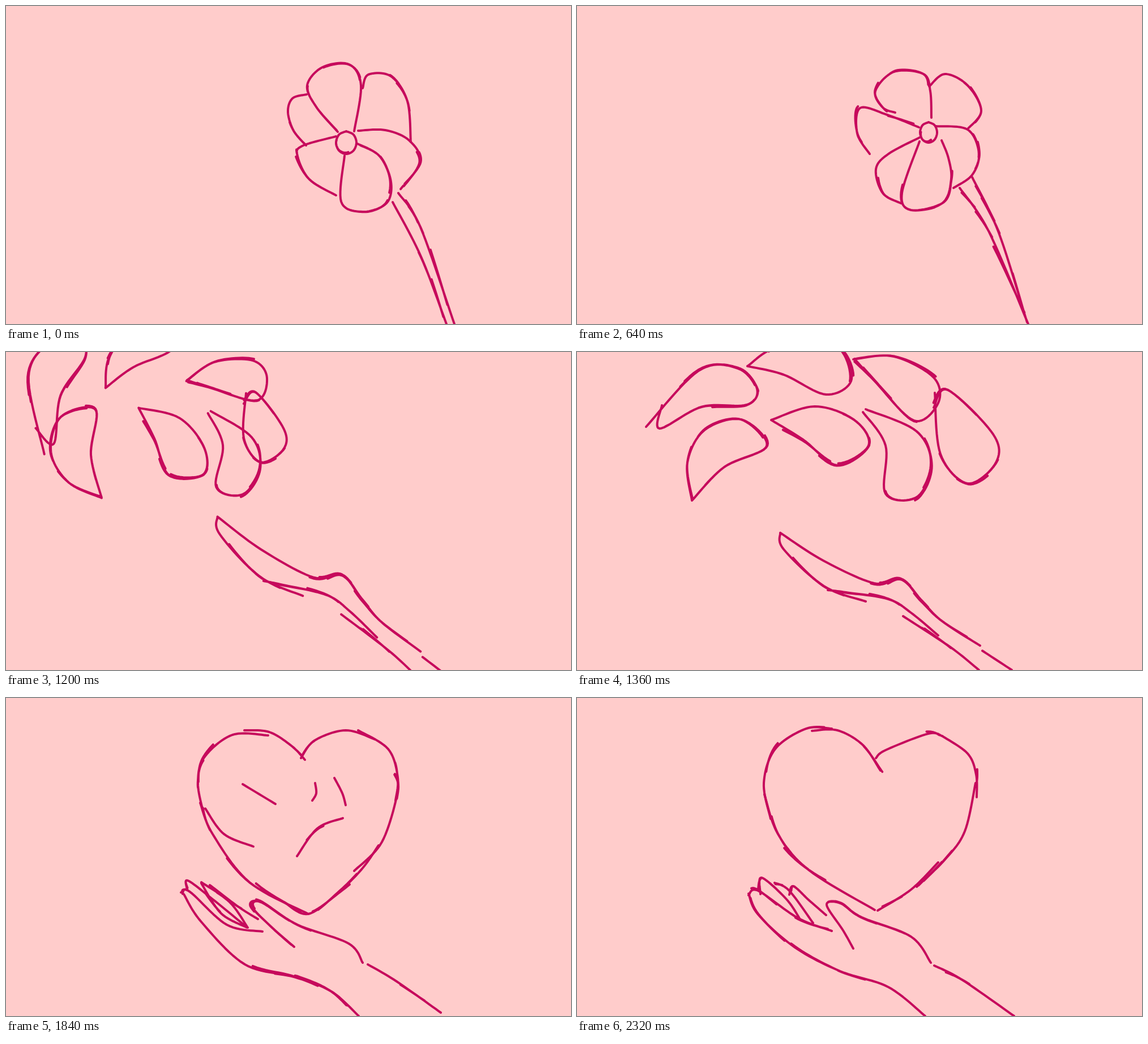
An HTML page with a canvas that plays this animation: 998x561 px, repeating every 2.4 s.

```html
<!DOCTYPE html>
<html lang="en">
<head>
<meta charset="utf-8">
<title>Flower to heart</title>
<style>
  html, body { margin: 0; height: 100%; overflow: hidden; background: #ffcccb; }
  canvas { display: block; width: 100vw; height: 100vh; }
</style>
</head>
<body>
<canvas id="stage" width="998" height="561"></canvas>
<script>
const LOOP = 2400, STEP = 80, HAND = 7;

const mix = (a, b, u) => a + (b - a) * u;
let seed = 7;
const random = () => (seed = seed * 16807 % 2147483647) / 2147483647;

const pairs = text => {
  const n = text.trim().split(/\s+/).map(Number), out = [];
  for (let i = 0; i < n.length; i += 2) out.push([n[i], n[i + 1]]);
  return out;
};
const ring = (x, y, rx, ry) => Array.from({ length: 9 }, (_, i) => {
  const a = i * Math.PI / 4;
  return [x + rx * Math.sin(a), y - ry * Math.cos(a)];
});

// Smooth curve through all points.
function curve(p) {
  const out = [];
  for (let i = 0; i < p.length - 1; i++) {
    const b = p[i], c = p[i + 1], a = p[i - 1] || b, d = p[i + 2] || c;
    for (let s = 0; s < 1; s += 1 / 12) {
      out.push([0, 1].map(k => b[k] + s / 2 * (c[k] - a[k]
        + s * (2 * a[k] - 5 * b[k] + 4 * c[k] - d[k] + s * (3 * (b[k] - c[k]) + d[k] - a[k])))));
    }
  }
  return [...out, p[p.length - 1]];
}

// The line itself plus short retraced bits that drift across it.
function sketch(points) {
  const line = curve(points), lines = [line];
  let length = 0;
  for (let i = 1; i < line.length; i++) {
    length += Math.hypot(line[i][0] - line[i - 1][0], line[i][1] - line[i - 1][1]);
  }
  for (let i = 0; i < Math.min(4, Math.floor(length / 80)); i++) {
    const start = Math.floor(random() * line.length * .7);
    const bit = line.slice(start, start + Math.ceil(line.length * mix(.2, .35, random())));
    const dx = mix(-4, 4, random()), dy = mix(-4, 4, random());
    lines.push(bit.map(([x, y], j) => {
      const k = 1 - 1.6 * j / bit.length;
      return [x + dx * k, y + dy * k];
    }));
  }
  return lines;
}

function part(text) {
  const strokes = typeof text === 'string' ? text.split('|').map(pairs) : [text];
  const main = strokes[0], [x0, y0] = main[0];
  const mean = k => main.reduce((sum, p) => sum + p[k], 0) / main.length;
  const reach = p => Math.hypot(p[0] - x0, p[1] - y0);
  const tip = main.reduce((a, b) => reach(b) > reach(a) ? b : a);
  return {
    x: mean(0), y: mean(1), size: reach(tip),
    angle: Math.atan2(tip[1] - y0, tip[0] - x0),
    lines: strokes.flatMap(sketch)
  };
}

// Each pose: six petals clockwise from the top, the centre, the stem or hand.
const pose = (...parts) => parts.map(part);

const left = pose(
  '586 222 548 178 532 140 559 108 606 103 627 140 615 221',
  '630 145 640 121 680 124 709 168 715 240',
  '622 220 670 219 712 237 732 275 697 323',
  '598 264 592 345 630 363 672 348 680 310 660 265 621 243',
  '583 230 523 247 515 265 536 306 583 334',
  '531 156 506 163 498 187 508 220 530 246',
  ring(601, 241, 18, 20),
  '693 330 732 390 792 561 | 683 346 733 442 778 561'
);

const right = pose(
  '613 209 559 160 560 115 600 88 647 95 653 140 640 196',
  '655 114 688 107 725 135 744 180 745 218',
  '641 205 700 212 740 235 742 280 705 318',
  '626 236 614 340 655 356 692 330 704 295 690 255 643 233',
  '611 218 553 252 552 285 580 322 612 346',
  '565 157 537 156 525 195 540 232 569 251',
  ring(631, 220, 14, 18),
  '730 321 757 395 784 561 | 703 317 745 430 778 561'
);

const back = pose(
  '562 188 540 179 527 150 560 116 612 120 624 150 626 197',
  '622 142 650 120 690 140 714 185 690 217',
  '634 212 690 218 710 260 698 298 665 321',
  '605 239 574 330 590 360 648 346 661 305 656 268 644 237',
  '605 232 550 261 528 288 540 330 572 348',
  '604 214 548 192 500 180 495 225 517 261',
  ring(621, 223, 15, 18),
  '698 302 745 400 795 558 | 676 321 727 397 797 561'
);

const gust = pose(
  '338 178 268 140 225 105 235 73 284 69 330 120 345 187',
  '391 238 397 150 440 158 448 205 412 276',
  '414 272 458 302 468 350 450 380 425 387',
  '388 268 342 360 355 402 408 400 424 360 420 310 402 276',
  '329 299 333 325 290 393 225 403 203 360 250 324 329 302',
  '266 233 240 245 120 233 91 185 140 147 210 176 266 233',
  ring(381, 265, 20, 17),
  '413 257 540 325 680 440 780 561 | 414 292 530 350 680 475 774 561'
);

const openHand = '359 319 435 368 525 408 572 400 610 440 645 475 712 518'
  + '| 359 319 365 348 436 413 510 440 | 443 420 475 424 550 436 590 460 638 500'
  + '| 576 466 660 521 710 561 | 716 527 768 561';
const swirl = pose(
  '301 25 365 40 440 75 485 48 455 -12 355 -9 301 25',
  '490 12 525 50 595 121 638 90 630 45 560 8 490 12',
  '505 106 545 165 545 250 600 256 626 200 600 140 510 101',
  '343 120 400 155 460 200 515 165 490 120 420 96 343 120',
  '203 262 195 195 225 138 290 119 335 166 260 203 203 262',
  '150 94 146 135 220 97 300 93 318 65 285 28 215 33 122 132',
  '630 98 655 67 735 145 740 195 690 232 642 180 632 72',
  openHand
);

const cuppedHand = '314 346 345 395 422 470 510 492 575 518 623 561'
  + '| 309 343 325 342 390 400 453 412 | 320 338 321 322 365 355 425 404'
  + '| 345 327 380 380 426 405 | 345 325 395 360 427 405 | 360 330 410 368 445 390'
  + '| 509 439 470 405 434 368 450 360 515 400 605 433 630 467 | 639 470 690 500 768 555';
const creased = pose(
  '528 109 505 85 465 60 421 57',
  '521 106 545 75 600 57 652 73 | 546 150 548 168 541 181',
  '687 134 692 165 664 254 615 305',
  '658 260 630 300 590 340 534 381 491 360 | 418 152 476 187 | 595 212 550 230 514 279',
  '343 185 365 240 430 325 534 381 | 352 195 385 240 437 262',
  '463 66 400 65 350 105 339 150 348 200',
  '622 57 675 90 692 140 688 181 | 580 141 594 168 600 189',
  cuppedHand
);

const calmHand = '303 345 320 382 385 440 465 482 550 510 615 561'
  + '| 303 348 320 340 390 388 450 411 | 324 346 326 317 370 355 395 392'
  + '| 349 326 375 340 417 397 | 375 347 382 332 410 357 440 383'
  + '| 488 442 470 410 441 365 465 362 503 387 590 421 625 467 | 631 472 680 497 772 561';
const smooth = pose(
  '536 128 505 83 460 57 415 58',
  '528 106 545 92 620 63 645 67',
  '704 150 685 235 650 285 600 333',
  '531 375 590 338 638 290',
  '331 170 355 240 410 304 526 374',
  '450 54 405 54 350 90 330 150 342 213',
  '645 67 690 98 705 135 706 175',
  calmHand
);

const keys = [
  [0, left], [320, right], [640, back], [960, gust],
  [1360, swirl], [1680, creased], [1840, creased], [2320, smooth]
];

const ctx = document.getElementById('stage').getContext('2d');
ctx.lineCap = ctx.lineJoin = 'round';
ctx.lineWidth = 4;
ctx.strokeStyle = '#c60a5c';

function place(item, x, y, scale, turn) {
  const cos = scale * Math.cos(turn), sin = scale * Math.sin(turn);
  ctx.beginPath();
  for (const line of item.lines) {
    line.forEach((p, i) => {
      const dx = p[0] - item.x, dy = p[1] - item.y;
      ctx[i ? 'lineTo' : 'moveTo'](x + dx * cos - dy * sin, y + dx * sin + dy * cos);
    });
  }
  ctx.stroke();
}

function draw(time) {
  ctx.fillStyle = '#ffcccb';
  ctx.fillRect(0, 0, 998, 561);
  let k = 0;
  while (k < keys.length - 2 && time >= keys[k + 1][0]) k++;
  const [t0, from] = keys[k], [t1, next] = keys[k + 1];
  const v = (time - t0) / (t1 - t0), u = v * v * (3 - 2 * v), arc = Math.sin(Math.PI * v);

  from.forEach((a, i) => {
    const b = next[i], item = u < .5 ? a : b;
    let x = mix(a.x, b.x, u), y = mix(a.y, b.y, u), scale = 1;
    let turn = arc * .01 * Math.sin(time + i * 2);
    if (i === HAND || t0 >= 960) {
      const swing = Math.atan2(Math.sin(b.angle - a.angle), Math.cos(b.angle - a.angle));
      scale = mix(a.size, b.size, u) / item.size;
      turn += a.angle + swing * u - item.angle;
    }
    if (i < HAND && t0 === 960) {         // petals sweep out to the left
      x -= 130 * arc;
      y -= 60 * arc;
    }
    if (i < HAND && t0 === 1840) {        // heart swells once
      const swell = 1 + .04 * arc;
      x = mix(515, x, swell);
      y = mix(240, y, swell);
      scale *= swell;
    }
    place(item, x, y, scale, turn);
  });
}

function tick() {
  draw(Math.floor(performance.now() % LOOP / STEP) * STEP);
  requestAnimationFrame(tick);
}
tick();
</script>
</body>
</html>
```
